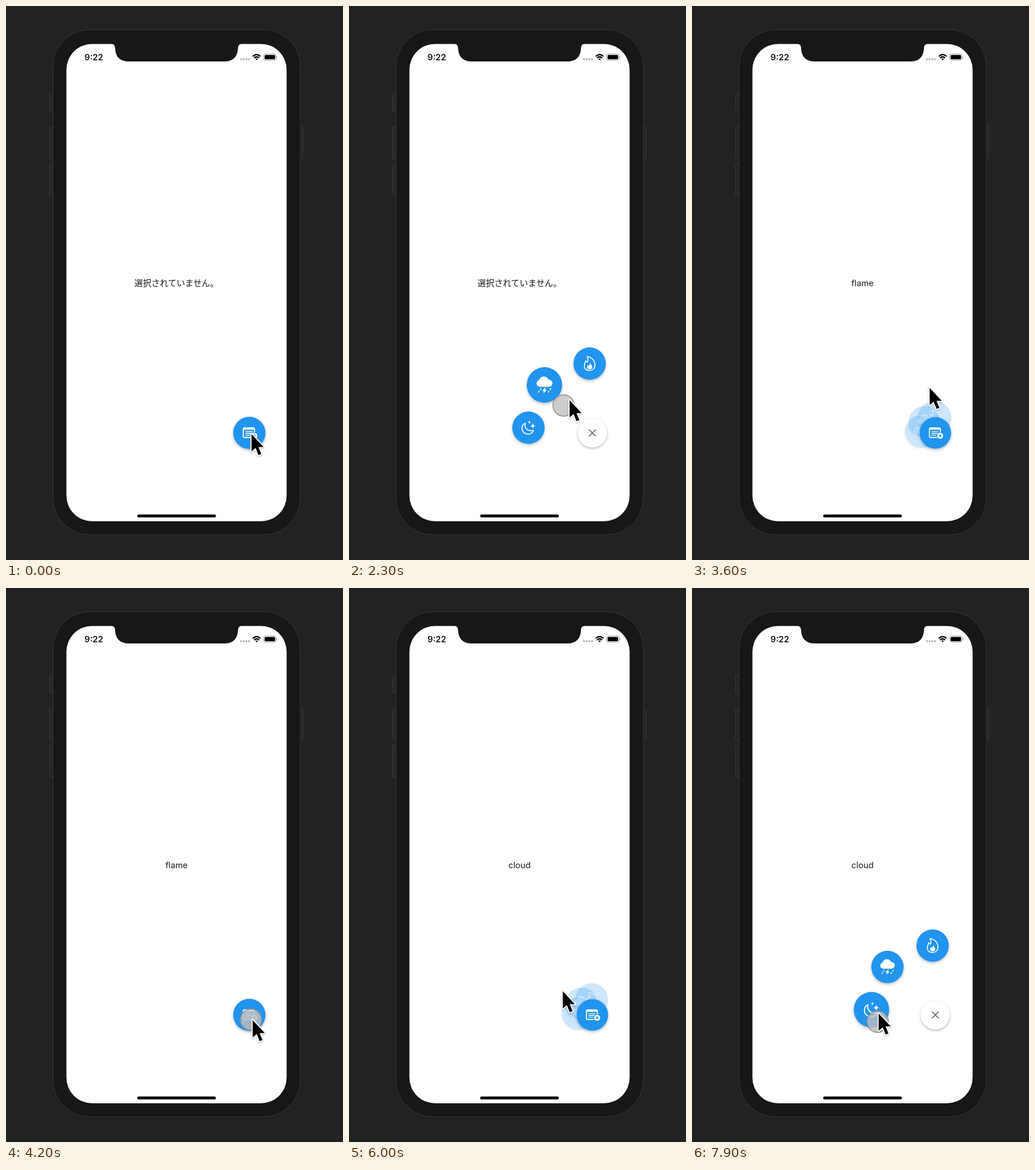
Recreate the animation shown at these times as an HTML page. Size 584 px wide and 959 px high, loop 8000 ms.

```html
<!DOCTYPE html>
<html lang="ja">
<head>
<meta charset="utf-8">
<title>Radial menu</title>
<style>
  html, body { margin: 0; width: 100%; height: 100%; overflow: hidden; background: #222; }
  svg { display: block; width: 584px; height: 959px; }
  text { font-family: Inter, "Noto Sans CJK JP", "Noto Sans CJK", sans-serif; }
  .soft { filter: blur(.4px); }
  .lift { filter: drop-shadow(0 2px 2.5px rgba(0, 0, 0, .28)); }
  .line { fill: none; stroke: #fff; stroke-linecap: round; stroke-linejoin: round; }
</style>
</head>
<body>
<svg viewBox="0 0 584 959">
  <rect width="584" height="959" fill="#222"/>
  <g class="soft">
    <g fill="#272727" stroke="#383838">
      <rect x="75.500" y="151" width="8" height="31" rx="1.500"/>
      <rect x="75.500" y="208.500" width="8" height="55.500" rx="1.500"/>
      <rect x="75.500" y="272.500" width="8" height="55" rx="1.500"/>
      <rect x="507" y="208.500" width="8" height="55.500" rx="1.500"/>
      <rect x="81.500" y="41" width="428.500" height="874.500" rx="64" fill="#171717" stroke="#383838"/>
    </g>
    <rect x="104.700" y="65.700" width="381.600" height="826.300" rx="44.500" fill="#fff"/>
    <path d="M182 65Q189 66 189 73Q190 96 213 96H378Q401 96 402 73Q402 66 409 65Z" fill="#171717"/>

    <text x="136" y="93.700" font-size="14.700" font-weight="600" fill="#111">9:22</text>
    <g fill="#bbb">
      <circle cx="407.200" cy="92" r="1.900"/><circle cx="411.800" cy="92" r="1.900"/>
      <circle cx="416.400" cy="92" r="1.900"/><circle cx="421" cy="92" r="1.900"/>
    </g>
    <g fill="none" stroke="#000" stroke-width="2.200">
      <path d="M427.600 87.200Q434.300 80.800 441 87.200"/>
      <path d="M430 90Q434.300 86 438.600 90"/>
      <path d="M432.100 91.600Q434.300 89.800 436.500 91.600L434.300 94Z" fill="#000" stroke="none"/>
    </g>
    <rect x="446.500" y="83" width="21.500" height="11" rx="3" fill="none" stroke="#999"/>
    <rect x="448.200" y="84.700" width="18.100" height="7.600" rx="1.600"/>
    <path d="M469.200 86.700Q471.400 88.500 469.200 90.300Z" fill="#999"/>
    <rect x="227.300" y="880.200" width="136.400" height="5" rx="2.500"/>
  </g>

  <text id="label" x="295.500" y="484.500" font-size="14.700" text-anchor="middle" fill="#1a1a1a"></text>

  <g id="moon" class="lift">
    <circle r="28" fill="#2194ee"/>
    <path class="line" stroke-width="1.700" d="M-5.500 -8C-13 -4.500 -13 5.500 -6.500 9.300C-.5 13 7 10.500 8.700 4.500C-1 7.500 -8 .5 -5.500 -8Z"/>
    <path fill="#fff" d="M7.500 -8.500Q8 -3.500 12.500 -3Q8 -2.500 7.500 2Q7 -2.500 2.500 -3Q7 -3.500 7.500 -8.500ZM1.500 -12.500Q1.800 -9.800 4.300 -9.500Q1.800 -9.200 1.500 -6.500Q1.200 -9.200 -1.300 -9.500Q1.200 -9.800 1.500 -12.500Z"/>
  </g>
  <g id="cloud" class="lift">
    <circle r="28" fill="#2194ee"/>
    <g fill="#fff">
      <circle cx="-1" cy="-5.500" r="8"/><circle cx="-7" cy="-2.500" r="5.500"/>
      <circle cx="7" cy="-2.700" r="5.700"/><rect x="-7" y="-4" width="14" height="7"/>
      <path d="M1 4.500L-4 9.500H-.8L-2 13.500L4 8H.8L2.200 4.500Z"/>
    </g>
    <path class="line" stroke-width="1.500" d="M-5.500 5.500l-1 2M-8.500 9.500l-1 2M10 5.500l-1 2M7 9.500l-1 2"/>
  </g>
  <g id="flame" class="lift">
    <circle r="28" fill="#2194ee"/>
    <path class="line" stroke-width="1.600" d="M-4.500 -12C2 -12 9.500 -6 9.300 2.500C9.200 8.500 5 12 -.5 12C-6 12 -9.500 8.500 -9.200 3.500C-9 0 -7.500 -2 -7 -5L-4 -2.500C-2.500 -5 -2.500 -8.500 -4.500 -12Z"/>
    <path fill="#fff" d="M.5 -1.500C1.500 1 4.500 3 4.500 6C4.300 9 2 10 0 10C-2.500 10 -4.500 8.500 -4.300 6C-4.200 4.500 -3.300 3.500 -3 2.500L-1.500 3.800C0 2.500 .8 .5 .5 -1.500Z"/>
  </g>

  <g id="button" class="lift">
    <circle r="28" fill="#fff"/>
    <path d="M-6 -6L6 6M6 -6L-6 6" stroke="#555" stroke-width="1.600" stroke-linecap="round"/>
    <g id="closedFace">
      <circle r="28" fill="#2194ee"/>
      <rect class="line" x="-10.500" y="-8.700" width="19.500" height="16.700" rx="2.200" stroke-width="1.800"/>
      <path d="M-11 -5.500V-7.500Q-11 -9.500 -9 -9.500H7.500Q9.500 -9.500 9.500 -7.500V-5.500Z" fill="#fff"/>
      <path class="line" stroke-width="1.400" d="M-6.500 -2.200H5.500M-6.500 1H5.500M-6.500 4.200H1"/>
      <circle cx="8.500" cy="5" r="5.800" fill="#fff" stroke="#2194ee"/>
      <path d="M5.700 5H11.300M8.500 2.200V7.800" stroke="#2194ee" stroke-width="1.500"/>
    </g>
  </g>

  <circle id="touch" r="18.500" fill="#c0c0c0" fill-opacity=".8" stroke="#8c8c8c" stroke-opacity=".85" stroke-width="1.800"/>
  <path id="cursor" d="M0 0V30L7 24L12 36.500L17 34.500L12 22.500H21Z" stroke="#fff" stroke-width="4" stroke-linejoin="round" paint-order="stroke" style="filter: drop-shadow(0 1px 1px rgba(0,0,0,.3))"/>
</svg>
<script>
const LOOP = 8000, STEP = 100;
const TOUCH_LAG = 45, HOVER_REACH = 64, HOVER_TIME = 150, CLOSE_TIME = 180;
const HOME = { x: 421.7, y: 739 };
const ITEMS = {
  moon: { dx: -110.7, dy: -9 },
  cloud: { dx: -83, dy: -83 },
  flame: { dx: -4.7, dy: -120 }
};

// The menu opens on a hold; the item under the finger is chosen on release.
const SESSIONS = [
  { press: 300, open: 240, release: 3505, choice: "flame" },
  { press: 4150, open: 4640, release: 5905, choice: "cloud" },
  { press: 6500, open: 6940, release: Infinity }
];

// Where the pointer turns or rests: [time, x, y]
const STOPS = [
  [1250, 425, 740], [1600, 333, 752], [2130, 358, 702], [2500, 412, 655],
  [2750, 336, 748], [2900, 380, 690], [3100, 413, 660], [3450, 417, 640],
  [3900, 395, 717], [4200, 427, 747], [4700, 427, 747], [5400, 370, 697],
  [6250, 370, 697], [6700, 411, 731], [7150, 411, 731], [7820, 322, 753],
  [7980, 324, 718]
];

const el = id => document.getElementById(id);
const clamp = v => Math.min(1, Math.max(0, v));
const smooth = k => k * k * (3 - 2 * k);
const place = (id, x, y, scale = 1) =>
  el(id).setAttribute("transform", `translate(${x} ${y}) scale(${scale})`);
const pressedAt = t => SESSIONS.some(s => t >= s.press && t < s.release);

function pointerAt(t) {
  let [, x, y] = STOPS[0];
  for (let i = 1; i < STOPS.length; i++) {
    const [t0, x0, y0] = STOPS[i - 1], [t1, x1, y1] = STOPS[i];
    const k = smooth(clamp((t - t0) / (t1 - t0)));
    x += (x1 - x0) * k;
    y += (y1 - y0) * k;
  }
  return { x, y };
}

function touchAt(t) {
  const { x, y } = pointerAt(t - TOUCH_LAG);
  return { x: x - 0.5, y: y + 2 };
}

function openness(t) {
  const session = SESSIONS.find(s => t >= s.open && t < s.release + CLOSE_TIME);
  if (!session) return 0;
  const closing = t - session.release;
  if (closing > 0) return (1 - closing / CLOSE_TIME) ** 2;
  const s = (t - session.open) * 0.011;
  return 1 - (1 + s) * Math.exp(-s);
}

function hoveredAt(t) {
  if (!pressedAt(t)) return null;
  const touch = touchAt(t);
  let nearest = null, reach = HOVER_REACH;
  for (const [name, { dx, dy }] of Object.entries(ITEMS)) {
    const distance = Math.hypot(HOME.x + dx - touch.x, HOME.y + dy - touch.y);
    if (distance < reach) [nearest, reach] = [name, distance];
  }
  return nearest;
}

// Share of the recent past spent over an item, so that it grows and shrinks gradually.
function hoverAmount(name, t) {
  const samples = 10;
  let hits = 0;
  for (let i = 0; i < samples; i++) {
    if (hoveredAt(t - i * HOVER_TIME / samples) === name) hits++;
  }
  return hits / samples;
}

function render(t) {
  const open = openness(t);
  for (const [name, { dx, dy }] of Object.entries(ITEMS)) {
    place(name, HOME.x + dx * open, HOME.y + dy * open, 1 + 0.095 * hoverAmount(name, t));
    el(name).setAttribute("opacity", open);
  }
  place("button", HOME.x, HOME.y, 1 - 0.095 * open);
  el("closedFace").setAttribute("opacity", clamp((0.75 - open) / 0.4));

  const done = SESSIONS.filter(s => t > s.release).pop();
  el("label").textContent = done ? done.choice : "選択されていません。";

  const pointer = pointerAt(t), touch = touchAt(t);
  place("cursor", pointer.x + 0.5, pointer.y + 1);
  place("touch", touch.x, touch.y);
  el("touch").setAttribute("visibility", pressedAt(t) ? "visible" : "hidden");
}

const start = performance.now();
function tick() {
  const t = (performance.now() - start) % LOOP;
  render(Math.floor(t / STEP) * STEP);
  requestAnimationFrame(tick);
}
tick();
</script>
</body>
</html>
```
